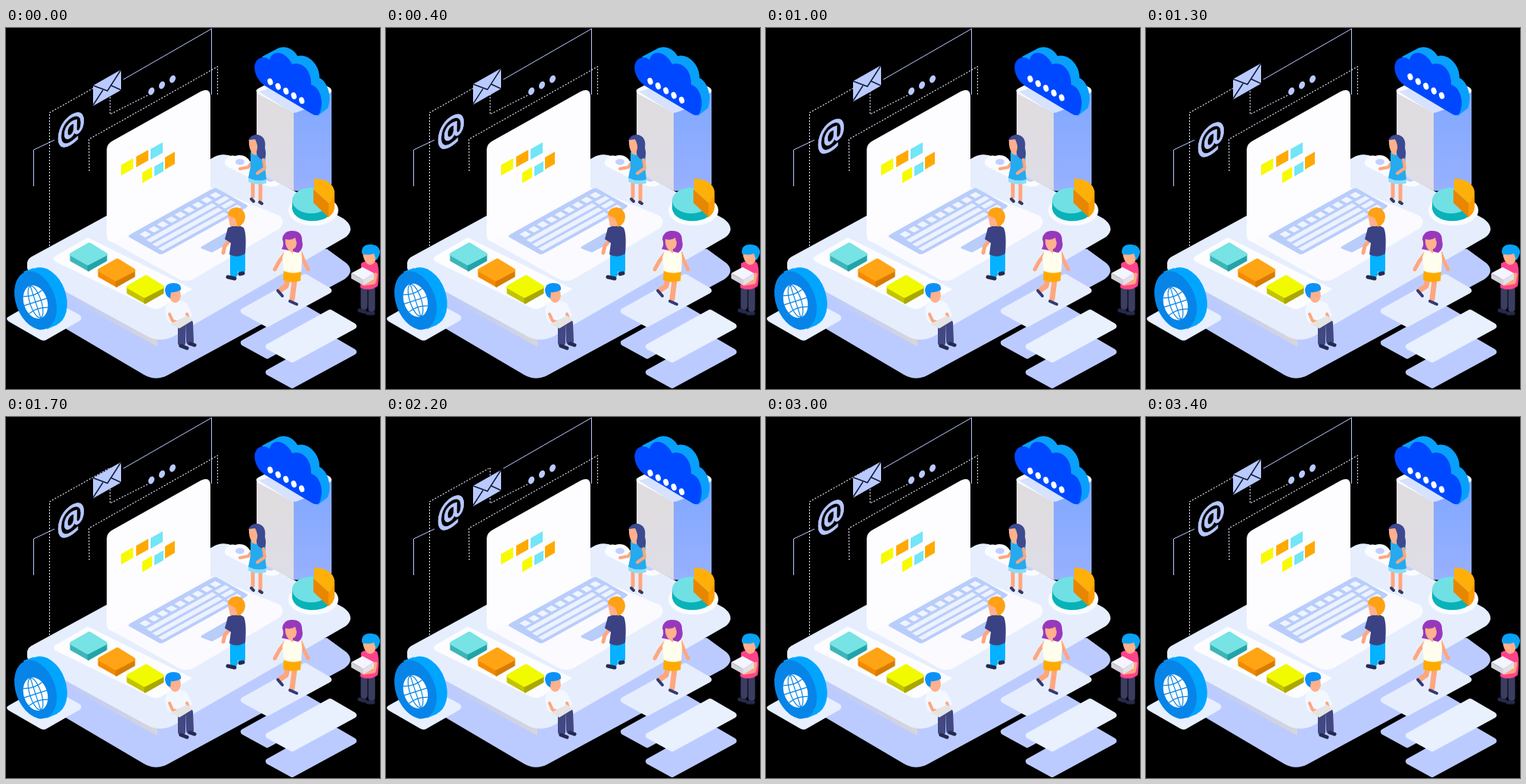
Recreate the animation shown at these times as an HTML page. Size 494 px wide and 477 px high, loop 3500 ms.

```html
<!DOCTYPE html>
<html lang="en">
<head>
<meta charset="utf-8">
<title>Isometric workspace</title>
<style>
html, body { margin: 0; width: 100%; height: 100%; overflow: hidden; background: #000; }
svg { display: block; width: 494px; height: 477px; }
.r { stroke-linejoin: round; stroke-linecap: round; }
.line { fill: none; stroke: #b8c8ff; stroke-width: 1; }
.dash { fill: none; stroke: #dfe6ff; stroke-width: 1.1; stroke-dasharray: 2 2; }
.limb { fill: none; stroke-linecap: round; stroke-linejoin: round; }
.skin { stroke: #ffa67e; }
.face { fill: #ffb08c; }
text { font: 600 49px "Open Sans", "Noto Sans", sans-serif; fill: #b8c8ff; stroke: #b8c8ff; stroke-width: .8; text-anchor: middle; }
</style>
</head>
<body>
<svg viewBox="0 0 494 477">
<defs>
  <linearGradient id="side" x2="1"><stop stop-color="#bccbfb"/><stop offset="1" stop-color="#d8d5da"/></linearGradient>
  <linearGradient id="wall" x2="0" y2="1"><stop stop-color="#e0dcde"/><stop offset="1" stop-color="#dedde6"/></linearGradient>
  <linearGradient id="tower" x2="0" y2="1"><stop stop-color="#80a8ff"/><stop offset="1" stop-color="#98b0ff"/></linearGradient>
</defs>

<!-- lower slab and globe plate -->
<path fill="#bccbff" d="M70 345V392L182 458Q197 467 213 459L447 332Q461 322 450 311L424 292L300 300Z"/>
<path fill="#e8f0ff" d="M4 381L46 357Q51 355 56 357L97 379Q102 383 97 387L55 411Q50 415 44 411L4 388Q-2 384 4 381Z"/>

<!-- main slab -->
<path fill="url(#side)" d="M82 340L200 405V421L82 357Z"/>
<path fill="#e6eefe" d="M28 317V310Q29 304 36 301L274 171Q286 164 300 170L446 252Q458 261 454 270Q452 275 444 279L222 407Q205 416 188 408L36 325Q28 321 28 317Z"/>
<path fill="#fdfdff" d="M66 301L108 277L246 345L204 370Q197 373 190 369L66 309Q60 305 66 301Z"/>

<!-- side desk -->
<path fill="#fbfcff" d="M290 175C293 168 300 168 303 169C311 166 319 170 322 176L360 194Q369 200 362 206Q354 212 342 208L292 183Q287 179 290 175Z"/>
<ellipse cx="309" cy="177" rx="6" ry="4" fill="#c2d0ff"/>
<ellipse cx="349" cy="199" rx="6" ry="4" fill="#c2d0ff"/>

<!-- tower -->
<path fill="url(#wall)" d="M331 83L380 109V215L331 190Z"/>
<path fill="url(#tower)" d="M380 109L430 83V206Q428 213 418 217L380 215Z"/>
<path fill="#fafbff" d="M333 80L378 57Q382 54 386 57L428 79Q432 83 428 86L386 110Q381 113 376 110L333 87Q328 83 333 80Z"/>
<path fill="#d7e2ff" d="M334 84L355 78L396 107L385 111Q380 113 375 110Z"/>
<path fill="#08a0fb" d="M338 38L357 28C366 22 379 26 385 37C400 33 415 50 414 66C425 71 431 91 425 106L412 116L370 86Z"/>
<path fill="#0048ff" d="M343 77C326 66 323 42 338 39Q343 38 348 42C352 27 370 31 378 48C393 43 404 59 403 75C415 78 421 98 414 113Q411 117 405 114Z"/>
<g id="dots" fill="#fff"></g>

<!-- pie chart -->
<ellipse cx="406" cy="241" rx="33" ry="20" fill="#fafcff"/>
<path fill="#08b2b8" d="M378 228V239C380 250 392 255 404 255Q418 255 426 249V228Z"/>
<ellipse cx="403" cy="228" rx="25" ry="17" fill="#70e0e4"/>
<path fill="#e98600" d="M406 213L426 231V250L406 231Z"/>
<path fill="#ff9c00" d="M426 231Q433 225 434 216V238Q433 245 426 250Z"/>
<path fill="#ffb008" d="M407 199Q431 200 434 216Q434 225 426 231L407 214Z"/>

<!-- laptop -->
<path class="r" fill="#fbfbff" stroke="#fbfbff" stroke-width="10" d="M140 277L268 215L358 252Q363 256 358 261L246 327Q238 331 230 327Z"/>
<path fill="#fdfdff" d="M133 161Q133 153 141 149L257 84Q270 78 270 91V211L143 282Q133 284 133 272Z"/>
<g id="tiles"></g>
<g id="keys" transform="matrix(1.16 -.645 .45 .25 160 275)"></g>
<path class="r" fill="#b9cdfb" stroke="#b9cdfb" stroke-width="3" d="M259 290L290 272L304 278L272 295Z"/>

<g id="buttons"></g>

<!-- globe disc -->
<ellipse transform="rotate(-20 52 355)" cx="52" cy="355" rx="27" ry="40" fill="#00a5ff"/>
<path fill="#00a5ff" d="M23 322L37 317L68 392L54 398Z"/>
<ellipse transform="rotate(-20 39 360)" cx="39" cy="360" rx="26" ry="40" fill="#0784e8"/>
<g id="globe"><g transform="rotate(-18 39 362)">
  <ellipse cx="39" cy="362" rx="15.5" ry="22.5" fill="#fff"/>
  <g fill="none" stroke="#0784e8" stroke-width="1.2">
    <ellipse cx="39" cy="362" rx="7.5" ry="22"/>
    <path d="M39 339V385M23 362H55M26 350Q39 355 52 350M26 374Q39 369 52 374"/>
  </g>
</g></g>

<g id="cards"></g>

<!-- woman at the desk -->
<g>
  <path class="limb skin" stroke-width="5" d="M326 200V223M336 201V227"/>
  <path class="limb" stroke="#343a68" stroke-width="4" d="M324 226L327 229M335 230L338 232"/>
  <path class="limb skin" stroke-width="4" d="M325 177L320 184L309 186"/>
  <path fill="#8edcf6" d="M321 194H343L344 205Q332 209 320 203Z"/>
  <path fill="#25aaf0" d="M323 164Q335 160 343 169L342 183L344 200Q332 204 320 198L323 183Z"/>
  <path fill="#3c4a91" d="M320 149Q323 140 333 141Q344 144 342 158Q345 170 340 174Q331 173 330 160Z"/>
  <path class="face" d="M321 148L329 147Q334 156 331 163V168L326 167Q320 159 321 148Z"/>
  <path class="limb skin" stroke-width="4" d="M340 174L342 185L332 192"/>
</g>

<!-- man at the laptop -->
<g>
  <path class="limb" stroke="#04b2ff" stroke-width="10" d="M301 300V325M311 298V320"/>
  <path class="limb" stroke="#252b50" stroke-width="5" d="M293 329L302 331M309 325L313 324"/>
  <path class="limb skin" stroke-width="5" d="M295 281L289 288L287 297"/>
  <path fill="#3b4284" d="M293 264Q306 258 314 264Q318 272 316 298Q305 305 295 299L297 284L289 279Z"/>
  <path class="face" d="M293 247L304 247L305 262L296 262Z"/>
  <path fill="#ffa114" d="M293 247Q294 237 305 237Q316 239 316 250Q315 260 306 263L303 252Z"/>
</g>

<!-- walking woman -->
<g>
  <path class="limb skin" stroke-width="7" d="M372 333L370 341L361 347M381 334L378 358"/>
  <path class="limb" stroke="#343a78" stroke-width="4" d="M359 347L365 354M375 361L384 365"/>
  <path class="limb skin" stroke-width="5" d="M368 299L361 308L355 319M389 297L394 309L399 319"/>
  <path fill="#ffaa00" d="M367 319H390L389 334Q377 338 366 333Z"/>
  <path fill="#fffdec" d="M368 295Q379 291 390 294L391 305L390 322Q378 326 367 321L365 303Z"/>
  <path fill="#9838bd" d="M365 279Q366 269 376 268Q391 267 391 280Q394 292 386 297L374 294L364 292Q368 286 365 279Z"/>
  <path class="face" d="M369 279Q377 281 382 277L384 284Q383 292 379 292V298L373 293Q368 287 369 279Z"/>
</g>

<!-- man with a box -->
<g>
  <path class="limb" stroke="#3b3d61" stroke-width="9" d="M473 341V368M483 340V371"/>
  <path class="limb" stroke="#25294a" stroke-width="5" d="M467 373L474 375M478 377L485 377"/>
  <path fill="#ff438b" d="M469 311Q481 304 490 310Q494 319 491 341Q480 349 468 343Z"/>
  <path class="face" d="M471 296H489V304Q487 313 480 313Q472 310 471 296Z"/>
  <path fill="#08a2f4" d="M470 298Q469 286 481 286Q493 286 494 296Q493 303 489 307L486 298Q478 301 470 298Z"/>
  <path class="limb skin" stroke-width="5" d="M488 326L486 336L473 338"/>
  <path fill="#f3f5ff" d="M456 324L471 316L486 324L472 333Z"/>
  <path fill="#d2d2d8" d="M456 324L472 333V340L456 331Z"/>
  <path fill="#e0e2ea" d="M472 333L486 324V332L472 340Z"/>
</g>

<!-- seated man -->
<g>
  <path class="limb" stroke="#414882" stroke-width="10" d="M222 386L232 393V416M234 384L242 390L243 414"/>
  <path class="limb" stroke="#252b50" stroke-width="5" d="M231 420L239 423M243 417L249 419"/>
  <path fill="#f3f7ff" d="M213 363Q229 357 239 364L246 379L241 386L222 393L213 387L210 372Z"/>
  <path class="limb skin" stroke-width="4" d="M216 378L220 387L227 389M239 378L241 384L235 388"/>
  <path fill="#e6e4e2" d="M217 391L239 380L247 386L229 397Z"/>
  <path class="face" d="M214 347H230L231 354Q229 364 222 363Q214 359 214 347Z"/>
  <path fill="#0b91f8" d="M210 347Q210 337 221 337Q232 337 231 346Q225 350 218 349L217 357Q211 355 210 347Z"/>
</g>

<!-- floating icons -->
<path class="line" d="M36.5 209V161L64 148M155 68L271.5 1V88"/>
<path class="dash" d="M57.5 288V112L137.5 67V114L187 89M110 189L109.500 147L279.500 51V89"/>
<g id="at"><text transform="matrix(.87 -.5 0 1 86 135)" y="15">@</text></g>
<g id="mail">
  <path fill="#b9caff" d="M115 76L152 55V82L115 103Z"/>
  <path fill="none" stroke="#111a38" stroke-width="1.5" d="M115 76L134 83L152 55M115 102L128 82M152 82L139 76"/>
</g>
<g id="ellipsis" fill="#b9caff"></g>
</svg>
<script>
const $ = id => document.getElementById(id);
const oval = (x, y, rx, ry, turn) =>
  `<ellipse cx="${x}" cy="${y}" rx="${rx}" ry="${ry}" transform="rotate(${turn} ${x} ${y})"/>`;
const poly = (pts, fill, round = 0) =>
  `<polygon class="r" points="${pts}" fill="${fill}" stroke="${fill}" stroke-width="${round}"/>`;
const rect = (x, y, w, h, fill, r = 0) =>
  `<rect x="${x}" y="${y}" width="${w}" height="${h}" rx="${r}" fill="${fill}"/>`;

$('dots').innerHTML = [0, 1, 2, 3, 4].map(i => oval(349 + 10.4 * i, 71 + 6.2 * i, 3.4, 4.6, -20)).join('');
$('ellipsis').innerHTML = [0, 1, 2].map(i => oval(192 + 14 * i, 83.500 - 8 * i, 3.7, 5.3, 25)).join('');

// Tiles lean with the screen.
const tile = ([x, y, w, h, fill]) => poly([x, y, x + w, y - w * .57, x + w, y + h - w * .57, x, y + h], fill);
$('tiles').innerHTML = [
  [152, 181, 16, 14, '#f8fa00'], [172, 170, 16, 14, '#ffa900'], [191, 160, 16, 14, '#72e5f6'],
  [180, 191, 13, 14, '#f8fa00'], [196, 183, 12, 13, '#72e5f6'], [210, 171, 13, 16, '#ffa900']
].map(tile).join('');

let keys = rect(0, 0, 100, 100, '#b9cdfb', 5);
for (let i = 0; i < 9; i++) keys += rect(9 + 10 * i, 13, 6.5, 17, '#f0f4ff');
for (const [row, start] of [[38, 7], [58, 6], [78, 5]]) {
  keys += rect(start, row, 75, 13, '#edf2ff') + rect(start + 78, row, 12, 13, '#edf2ff');
}
$('keys').innerHTML = keys;

const button = ([x, y, top, left, right]) =>
  poly([x - 23, y, x, y + 13, x, y + 21, x - 23, y + 8], left, 3) +
  poly([x, y + 13, x + 23, y, x + 23, y + 8, x, y + 21], right, 3) +
  poly([x - 22, y, x + 1, y - 13, x + 22, y, x - 1, y + 12], top, 5);
$('buttons').innerHTML = [
  [109, 299, '#77e3e4', '#3db5b8', '#22a3a8'],
  [146, 320, '#ffa414', '#f48a00', '#d67c00'],
  [184, 342, '#f2fa00', '#c4c300', '#aaa800']
].map(button).join('');

const card = ([x, y, fill]) =>
  poly([x + 5, y, x + 36, y + 17, x + 117, y - 27, x + 86, y - 45], fill, 8);
$('cards').innerHTML = [
  [309, 416, '#bccbff'], [309, 374, '#e6eefe'], [342, 455, '#bccbff'], [342, 421, '#e9f1ff']
].map(card).join('');

// Vertical drift of each floating part, in pixels.
const LOOP = 3500, STEP = 100;
const times = [0, 700, 1300, 1700, 2200, 2600, 3400, LOOP];
const drift = {
  mail: [0, -3, -8.5, 4.5, 15, 7.5, 0, 0],
  at: [0, 4, 13, 2, -8, -4, 0, 0],
  dots: [0, -1, -6.5, -1, 3, .5, 0, 0],
  globe: [0, -4, 2, 4, 1, 0, 0, 0]
};

function valueAt(values, t) {
  const i = times.findIndex(end => end > t) - 1;
  const p = (t - times[i]) / (times[i + 1] - times[i]);
  return values[i] + (values[i + 1] - values[i]) * p;
}

const start = performance.now();
function draw(now) {
  const t = Math.floor((Math.max(0, now - start) % LOOP) / STEP) * STEP;
  for (const id in drift) $(id).setAttribute('transform', `translate(0 ${valueAt(drift[id], t)})`);
  requestAnimationFrame(draw);
}
draw(start);
</script>
</body>
</html>
```
